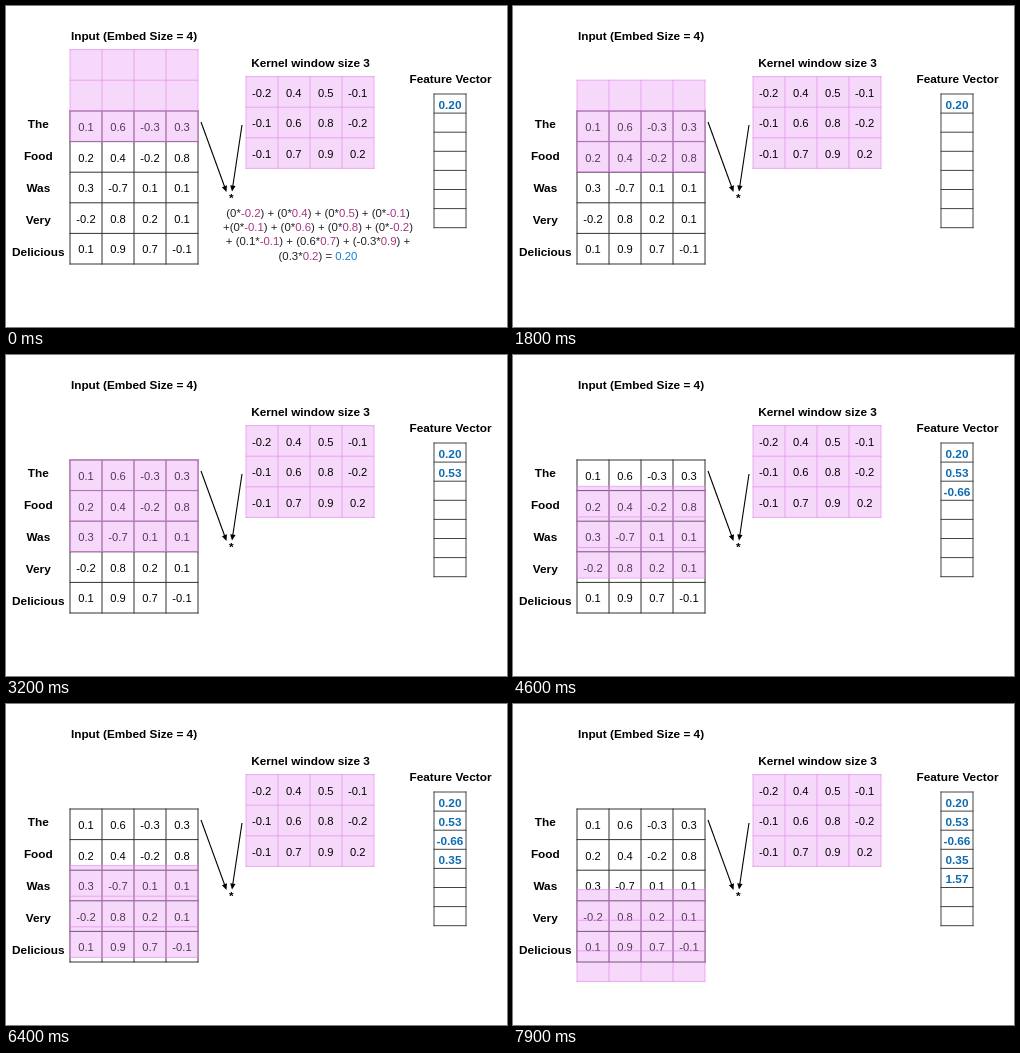
Animation of 501 by 321 pixels, one loop 8 s. Source, as an HTML page:

```html
<!DOCTYPE html>
<html lang="en">
<head>
<meta charset="utf-8">
<title>Text convolution</title>
<style>
  html, body { margin: 0; width: 100%; height: 100%; overflow: hidden; background: #fff; }
  svg { display: block; width: 100vw; height: 100vh; }
  text { font-family: "Liberation Sans", Arial, Helvetica, sans-serif; font-size: 11.2px; text-anchor: middle; white-space: pre; }
  .bold { font-size: 11.8px; font-weight: bold; }
  .value { fill: #0f6bb0; }
  .formula { font-size: 11.4px; fill: #222; }
  .weight { fill: #a63585; }
  .result { fill: #1b7ec6; }
</style>
</head>
<body>
<svg id="stage" viewBox="0 0 501 321"></svg>
<script>
const LOOP = 8000;
const MOVE = 1000;
const ROW = 30.6;
const COL = 32;
const TOP = 43.6;

const input = [
  ["0.1", "0.6", "-0.3", "0.3"],
  ["0.2", "0.4", "-0.2", "0.8"],
  ["0.3", "-0.7", "0.1", "0.1"],
  ["-0.2", "0.8", "0.2", "0.1"],
  ["0.1", "0.9", "0.7", "-0.1"]
];
const kernel = [
  ["-0.2", "0.4", "0.5", "-0.1"],
  ["-0.1", "0.6", "0.8", "-0.2"],
  ["-0.1", "0.7", "0.9", "0.2"]
];
const words = ["The", "Food", "Was", "Very", "Delicious"];
const results = ["0.20", "0.53", "-0.66", "0.35", "1.57"];
// Kernel weights sit between underscores, the result between bars.
const formula = [
  "(0*_-0.2_) + (0*_0.4_) + (0*_0.5_) + (0*_-0.1_)",
  "+(0*_-0.1_) + (0*_0.6_) + (0*_0.8_) + (0*_-0.2_)",
  "+ (0.1*_-0.1_) + (0.6*_0.7_) + (-0.3*_0.9_) +",
  "(0.3*_0.2_) = |0.20|"
];
const moveStarts = [830, 2180, 3830, 5640, 7305];
const valueStarts = [-1000, 1850, 3300, 4830, 6620];

const stage = document.getElementById("stage");

function add(parent, tag, attrs, content) {
  const node = document.createElementNS("http://www.w3.org/2000/svg", tag);
  for (const key in attrs) node.setAttribute(key, attrs[key]);
  if (content) node.textContent = content;
  parent.appendChild(node);
  return node;
}

function label(x, y, content, cls = "") {
  return add(stage, "text", { x, y, class: cls }, content);
}

function grid(parent, x, y, cols, rows, w, h, stroke, width) {
  let d = "";
  for (let i = 0; i <= cols; i++) d += `M${x + i * w} ${y}v${rows * h}`;
  for (let j = 0; j <= rows; j++) d += `M${x} ${y + j * h}h${cols * w}`;
  add(parent, "path", { d, fill: "none", stroke, "stroke-width": width, "stroke-linecap": "square" });
}

function numbers(rows, x, y) {
  rows.forEach((row, j) => row.forEach((n, i) => label(x + i * COL, y + j * ROW, n)));
}

function pinkPanel(x, y) {
  const g = add(stage, "g", {});
  add(g, "rect", { x, y, width: 4 * COL, height: 3 * ROW, fill: "rgb(230,148,241)", "fill-opacity": 0.365 });
  grid(g, x, y, 4, 3, COL, ROW, "rgba(228,130,232,.62)", 1);
  return g;
}

function arrow(x1, y1, x2, y2) {
  const angle = Math.atan2(y2 - y1, x2 - x1) * 180 / Math.PI;
  add(stage, "path", { d: `M${x1} ${y1}L${x2} ${y2}`, stroke: "#000", "stroke-width": 1.1 });
  add(stage, "path", { d: "M2 0L-4 -2.7V2.7Z", transform: `translate(${x2} ${y2}) rotate(${angle})` });
}

label(128, 34, "Input (Embed Size = 4)", "bold");
label(304.5, 61, "Kernel window size 3", "bold");
label(444.5, 77, "Feature Vector", "bold");
words.forEach((word, i) => label(32.3, 122 + i * 32.1, word, "bold"));

grid(stage, 64, 105, 4, 5, COL, ROW, "#333", 1);
numbers(input, 80, 125);
const panel = pinkPanel(64, 0);

pinkPanel(240, 70.6);
numbers(kernel, 255.7, 90.5);

arrow(195, 116, 219.8, 184);
arrow(236, 119, 226.3, 183.5);
label(225.3, 195.5, "*", "bold");

const sum = add(stage, "g", {});
formula.forEach((line, i) => {
  const text = add(sum, "text", { x: 312, y: 210.6 + i * 14.35, class: "formula" });
  line.split(/(_[^_]+_|\|[^|]+\|)/).forEach(part => {
    const cls = part[0] === "_" ? "weight" : part[0] === "|" ? "result" : "";
    if (part) add(text, "tspan", { class: cls }, part.replace(/[_|]/g, ""));
  });
});

grid(stage, 428, 88, 1, 7, 32, 19.1, "#444", 1);
const values = results.map((n, i) => label(444, 103 + i * 19.05, n, "bold value"));

const ramp = (t, start, length) => Math.min(1, Math.max(0, (t - start) / length));
const ease = p => p * p * (3 - 2 * p);

function draw(t) {
  const steps = moveStarts.reduce((total, start) => total + ease(ramp(t, start, MOVE)), 0);
  panel.setAttribute("transform", `translate(0 ${TOP + steps * ROW})`);
  sum.setAttribute("opacity", 1 - ramp(t, 780, 300));
  values.forEach((v, i) => v.setAttribute("opacity", ramp(t, valueStarts[i], 200)));
}

const began = performance.now();
function tick() {
  draw((performance.now() - began) % LOOP);
  requestAnimationFrame(tick);
}
draw(0);
requestAnimationFrame(tick);
</script>
</body>
</html>
```
